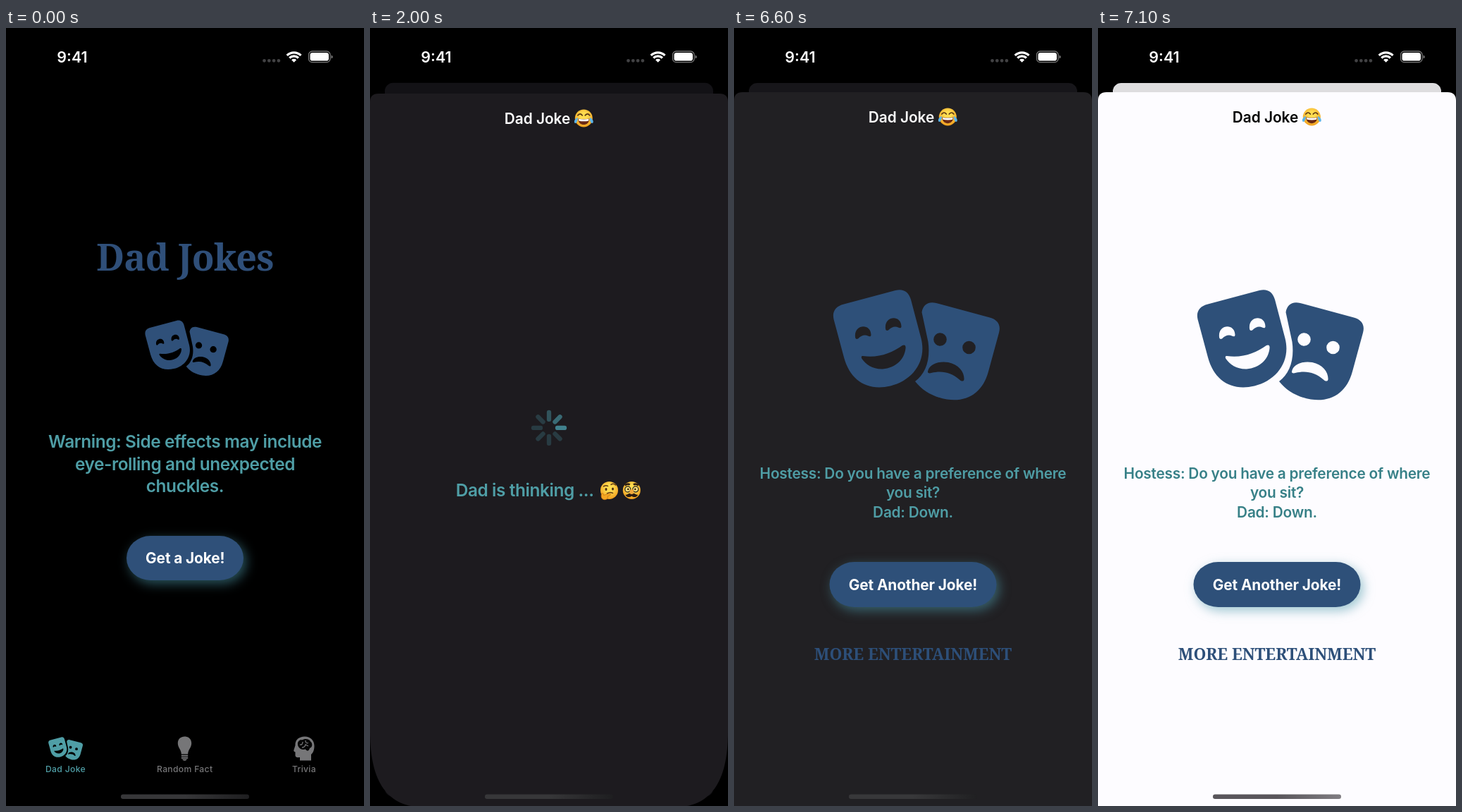
Animation of 508x1103 px, one loop 8 s. Source, as an HTML page:

```html
<!DOCTYPE html>
<html lang="en">
<head>
<meta charset="utf-8">
<title>Dad Jokes</title>
<style>
  html, body { margin: 0; width: 100%; height: 100%; overflow: hidden; background: #000; }
  svg { display: block; width: 100vw; height: 100vh; }
  text { font-family: Inter, "Open Sans", sans-serif; font-weight: 600; text-anchor: middle; white-space: pre; }
  .serif { font-family: "Noto Serif", serif; font-weight: 700; }
  .large { font-size: 24.4px; letter-spacing: -.42px; }
  .body { font-size: 20.8px; letter-spacing: -.22px; }
  .bold { font-size: 20.8px; font-weight: 700; letter-spacing: -.1px; }
  .tab { font-size: 12.2px; font-weight: 500; letter-spacing: .3px; }
  .glow { filter: drop-shadow(4px 5px 8px rgba(75, 152, 168, .55)); }
</style>
</head>
<body>
<svg viewBox="0 0 508 1103">
  <defs>
    <path id="masks" fill-rule="evenodd" d="M156 391.5L229 372C240 369 248 374 251 385L265.5 440C274 473 253 500 222 507.5C189 515 165 500 156 467L141.5 413C139 402 144 394.5 156 391.5Z
      M172 438C170 420 194 418 194.5 435C194.5 438 192 437.5 190 436.5C186 434 180 436 177 439.5C175 442 172 441 172 438Z
      M215 426C213 408 237 406 237.500 423C237.500 426 235 425.500 233 424.500C229 422 223 424 220 427.500C218 430 215 429 215 426Z
      M183 465C205 468 224 461 239 450C242 448.500 244 450 243.500 454C242 470 229 482 211 483.500C197 484 187 477 181.500 469C180 466 181 465 183 465Z
      M266.500 403C268 393 275 387 287 390L363 410.500C374 413.500 379 421 376 432L361 487C353 517 331 531 302 526.500C283 523 268 515 257 501C272 490 279 470 275.500 445Z
      M283.200 441.500a9.300 9.300 0 1 0 18.600 0a9.300 9.300 0 1 0-18.600 0Z
      M324.200 453a9.300 9.300 0 1 0 18.600 0a9.300 9.300 0 1 0-18.600 0Z
      M275 487C277 477 290 471.500 304 474C319 477 327 488 326.500 498C326.500 501 323 501.500 320.500 499C308 488 295 485.500 280 489C277 490 274.500 489 275 487Z"/>
    <radialGradient id="face" cy=".38" r=".65">
      <stop offset=".3" stop-color="#ffdc50"/><stop offset="1" stop-color="#f09a1a"/>
    </radialGradient>
    <linearGradient id="barFill">
      <stop id="barLeft" offset=".5"/><stop id="barRight" offset="1"/>
    </linearGradient>
    <g id="laugh" stroke-linecap="round">
      <circle r="12.500" fill="url(#face)"/>
      <path d="M-8.500 -4q3.500-4 6.500 0M2 -4q3.500-4 6.500 0" fill="none" stroke="#5b3714" stroke-width="1.700"/>
      <path d="M-8 .5Q0 2 8 .5C8 12-8 12-8 .5Z" fill="#6b2a14"/>
      <path d="M-7.300 .9Q0 2.300 7.300 .9L6.800 3.800Q0 5-6.800 3.800Z" fill="#fff"/>
      <path id="tear" d="M-8.500 -1C-12 0-14.500 4-13 6.500C-10.500 8.500-8.500 4-8.500 -1Z" fill="#5cb4ea"/>
      <use href="#tear" transform="scale(-1 1)"/>
    </g>
    <g id="think" fill="none" stroke="#5b3714" stroke-width="1.600" stroke-linecap="round">
      <circle r="12.500" fill="url(#face)" stroke="none"/>
      <path d="M-8 -5.500q3-2 6-.5M2.500 -8q3.500-2.500 6.500.5M-3 4.500q4-2.500 8-.5"/>
      <g fill="#4a2c12" stroke="none"><ellipse cx="-4.500" cy="-1.500" rx="1.500" ry="2"/><ellipse cx="5" cy="-2" rx="1.500" ry="2"/></g>
      <path d="M-11 5.500C-10 3-8 4-8 7L0 4.800C2.500 4.500 2.500 6.800 .5 7.500L-2.500 8.600C-1 12-5 14-8 13C-11 12-12 9-11 5.500Z" fill="#f5a623" stroke="#c97a12" stroke-width=".8"/>
    </g>
    <g id="disguise">
      <circle r="12.500" fill="url(#face)"/>
      <path d="M-9.500 -7q3.500-3 7-1M2.500 -8q3.500-2 7 1" fill="none" stroke="#2b1c12" stroke-width="2.600"/>
      <g fill="#ffe27a" stroke="#222" stroke-width="1.200"><circle cx="-5.500" cy="-1.500" r="4"/><circle cx="5.500" cy="-1.500" r="4"/></g>
      <g fill="#39230f"><circle cx="-5" cy="-1.500" r="1.300"/><circle cx="5" cy="-1.500" r="1.300"/></g>
      <path d="M0 4.500C-4 3-6 7.500-9 6C-7 11-2 10 0 8C2 10 7 11 9 6C6 7.500 4 3 0 4.500Z" fill="#2b1c12"/>
      <ellipse cy="2" rx="3" ry="3.500" fill="#f2a93c"/>
    </g>
  </defs>

  <rect width="508" height="1103"/>
  <g id="home">
    <rect id="card" width="508" height="1103"/>
    <g id="homeBody">
      <text class="serif" x="254" y="344" font-size="52" letter-spacing="-.7" fill="#2f4f79">Dad Jokes</text>
      <use href="#masks" transform="translate(126.700 228.300) scale(.502)" fill="#2f5079"/>
      <g class="large" fill="#4f9ea6">
        <text x="254" y="595">Warning: Side effects may include</text>
        <text x="254" y="626.600">eye-rolling and unexpected</text>
        <text x="254" y="658.200">chuckles.</text>
      </g>
      <rect id="button" class="glow" x="171" y="720" width="166" height="63" rx="34" ry="31.500"/>
      <text id="buttonText" class="bold" x="254.300" y="759.300">Get a Joke!</text>
      <g fill="#4f9ea6">
        <use href="#masks" transform="translate(31 928.400) scale(.207)"/>
        <text class="tab" x="84.500" y="1055">Dad Joke</text>
      </g>
      <g fill="#767678">
        <path d="M248.800 1029.500C248.800 1023 243.800 1020.500 243.800 1014C243.800 1008 248 1004.500 253.500 1004.500S263.200 1008 263.200 1014C263.200 1020.500 258.200 1023 258.200 1029.500Z"/>
        <path d="M248.800 1030.800h9.400v1.900h-9.400zM248.800 1033.800h9.400v1.900h-9.400zM250 1036.600h7q-1 2.200-3.500 2.200t-3.500-2.200z"/>
        <text class="tab" x="253.700" y="1055">Random Fact</text>
        <path d="M433 1038.500V1030C436.500 1027 437.500 1022 437.500 1018C437.500 1010 432 1004.500 424 1004.500C415 1004.500 410 1010 410.500 1017L408.300 1024Q408 1026 410.500 1026.500V1031C410.500 1033.500 412 1034.500 417 1034V1038.500Z"/>
        <path d="M414.500 1018C412.500 1013 416 1008.500 420 1009.500C424 1006.500 431 1008 432 1011.500C435.500 1014 435 1020 431 1021C430 1025 427 1026 425 1022.500C421 1024 416 1022 414.500 1018Z" fill="#050505"/>
        <path d="M417 1016q4 1 4-4M425 1010q0 5 4 3.500M420 1020q4 0 5-4l4 2" fill="none" stroke="#767678" stroke-width="1.300"/>
        <text class="tab" x="423" y="1055">Trivia</text>
      </g>
    </g>
  </g>

  <g id="sheet">
    <path id="panel"/>
    <text id="title" x="237.500" y="133.800" font-size="20.800">Dad Joke</text>
    <use href="#laugh" x="303.300" y="126"/>
    <g id="loading">
      <g id="spinner" stroke="#4b9ba9" stroke-width="6.300" stroke-linecap="round" transform="translate(254 565)"></g>
      <text class="large" x="219.700" y="662" fill="#4f9ea6">Dad is thinking ...</text>
      <use href="#think" x="339.500" y="653.500"/>
      <use href="#disguise" x="371.300" y="653.500"/>
    </g>
    <g id="joke">
      <use href="#masks" fill="#2e5079"/>
      <g id="lines" class="body">
        <text x="254" y="638.500">Hostess: Do you have a preference of where</text>
        <text x="254" y="666.200">you sit?</text>
        <text x="254" y="693.900">Dad: Down.</text>
      </g>
      <rect class="glow" x="135.500" y="757" width="237" height="64" rx="35" ry="32" fill="#2e5079"/>
      <text class="bold" x="254" y="796.800" fill="#fff">Get Another Joke!</text>
      <text class="serif" x="254" y="896" font-size="22.800" letter-spacing="-.1" fill="#2d4f79">MORE ENTERTAINMENT</text>
    </g>
  </g>

  <g fill="#fff">
    <text x="94" y="48.600" font-size="21.500">9:41</text>
    <path d="M366.500 46.300h20.600" stroke="#424244" stroke-width="4.800" stroke-linecap="round" stroke-dasharray="0 6.800"/>
    <path d="M398.700 38.900a14 14 0 0 1 19.800 0M402.300 42.500a8.900 8.900 0 0 1 12.600 0" fill="none" stroke="#fff" stroke-width="3.200"/>
    <path d="M408.600 48.800l-3.500-3.500a5 5 0 0 1 7 0z"/>
    <rect x="429.500" y="33" width="30.500" height="15.600" rx="5" fill="none" stroke="#777" stroke-width="1.300"/>
    <rect x="431.500" y="35" width="26.500" height="11.600" rx="3.400"/>
    <path d="M461.600 38.500q2 .8 2 2.400t-2 2.400z" fill="#888"/>
  </g>
  <rect x="163" y="1086.500" width="182" height="6.500" rx="3.200" fill="url(#barFill)"/>
</svg>
<script>
const LOOP = 8000, STEP = 100;
const THEME = [.02, .13, .33, .56, .83, 1];   // dark to light, one value per step
const $ = id => document.getElementById(id);
const clamp = v => Math.min(1, Math.max(0, v));
const ease = v => v * v * (3 - 2 * v);
const set = (id, attrs) => Object.entries(attrs).forEach(([k, v]) => $(id).setAttribute(k, v));

function mix(a, b, p) {
  const part = (c, i) => parseInt(c.slice(i, i + 2), 16);
  return `rgb(${[1, 3, 5].map(i => Math.round(part(a, i) + (part(b, i) - part(a, i)) * p))})`;
}

const spokes = Array.from({ length: 8 }, (_, i) => {
  const line = document.createElementNS("http://www.w3.org/2000/svg", "path");
  line.setAttribute("d", "M0-12V-22");
  line.setAttribute("transform", `rotate(${i * 45})`);
  $("spinner").append(line);
  return line;
});

// Critically damped spring: the part of the way still to go
function remaining(t) {
  const x = Math.max(0, t - 1560) * .0194;
  return (1 + x) * Math.exp(-x);
}

function panelPath(moving) {
  const bottom = moving
    ? "V995C508 1068 483 1103 430 1103H78C25 1103 0 1068 0 995Z"
    : "V1103H0Z";
  return "M0 103Q0 91 12 91H496Q508 91 508 103" + bottom;
}

function draw(t) {
  const left = remaining(t), shown = 1 - left;
  const light = t < 6600 ? 0 : THEME[Math.min(5, (t - 6600) / STEP)];
  const press = t < 1400 ? 0 : clamp((1700 - t) / 100);
  const swap = ease(clamp((t - 3300) / 600));

  set("button", { fill: mix("#2f5079", "#5b7595", press) });
  set("buttonText", { fill: mix("#ffffff", "#c8cdd2", press) });
  set("home", { transform: `translate(${21 * shown} ${78 * shown}) scale(${1 - .0827 * shown})` });
  set("homeBody", { opacity: 1 - .4 * shown });
  set("card", {
    rx: 13 * shown,
    fill: light ? mix("#131216", "#dedddf", light) : mix("#000000", "#131216", shown)
  });

  set("sheet", {
    transform: `translate(0 ${1012 * left})`,
    visibility: t < 1600 ? "hidden" : "visible"
  });
  set("panel", { d: panelPath(left > .001), fill: mix("#1d1b1f", "#fdfcff", light) });
  set("title", { fill: mix("#ffffff", "#000000", light) });
  set("lines", { fill: mix("#4f9ea6", "#378087", light) });
  set("loading", { opacity: 1 - swap });
  set("joke", { opacity: swap });
  set("barLeft", { "stop-color": mix("#373739", "#59565b", light) });
  set("barRight", { "stop-color": mix("#1e1e20", "#807d82", light) });

  const head = Math.round(t / STEP) + 6;
  spokes.forEach((s, i) => {
    const age = (head - i) % 8;
    s.setAttribute("opacity", Math.max(.25, .8 - .18 * age));
  });
}

function tick() {
  draw(Math.floor(performance.now() % LOOP / STEP) * STEP);
  requestAnimationFrame(tick);
}
tick();
</script>
</body>
</html>
```
